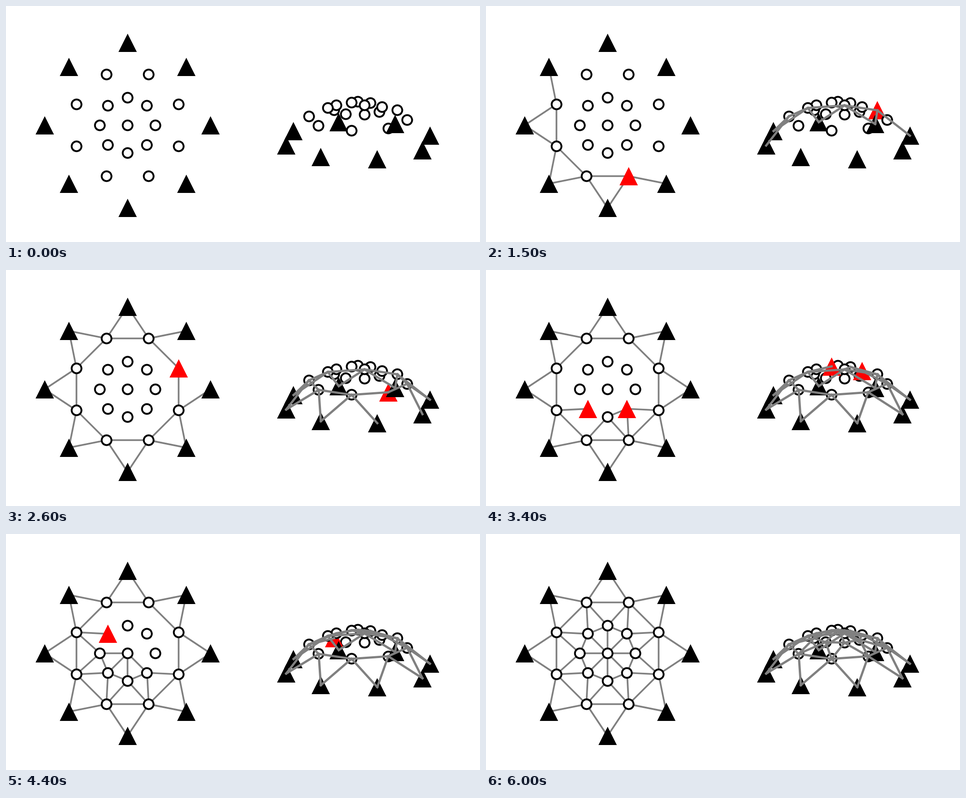
Animation, 1058 px wide and 529 px high, one loop 6.5 s. Source, as an HTML page with a canvas:

```html
<!DOCTYPE html>
<html lang="en">
<head>
<meta charset="utf-8">
<title>Dome assembly</title>
<style>
  html, body { margin: 0; width: 100%; height: 100%; overflow: hidden; background: #fff; }
  canvas { display: block; }
</style>
</head>
<body>
<canvas id="stage" width="1058" height="529"></canvas>
<script>
const ctx = document.getElementById('stage').getContext('2d');
const LOOP = 6500, HOLD = 500, STEP = 100;
const RADIUS = 185.1, RAD = Math.PI / 180;
const TURN = 30 * RAD, TILT = 15 * RAD, VIEW_SCALE = 0.897;

// Rings from the apex down: keys, radius and height as parts of RADIUS, first angle
const rings = [
  { keys: '0', r: 0, z: 0.543, start: 0 },
  { keys: '12345678', r: 1 / 3, z: 0.448, start: 0 },
  { keys: 'abcdefgh', r: 2 / 3, z: 0.314, start: 202.5 },
  { keys: 'ABCDEFGH', r: 1, z: 0, start: 225 }
];

// Assembly order: the first joint of each word is tied to the others in turn
const bars = ('aBb bBCc cCD aA dcDE edFfE haA hg gHG hH fgGF ' +
  '7cd8 8d 6b 8e 67c 5ba6 07865 4ah5 1e8f 04 2gf1 3hg24 0321')
  .split(' ').flatMap(([from, ...ends]) => ends.map(end => from + end));

const names = [], plan = {}, view = {};
for (const { keys, r, z, start } of rings) {
  [...keys].forEach((key, i) => {
    const a = (start - 45 * i) * RAD, dist = r * RADIUS;
    const side = VIEW_SCALE * dist;
    const lift = VIEW_SCALE * z * RADIUS * Math.cos(TILT);
    names.push(key);
    plan[key] = [271.3 + dist * Math.cos(a), 267.4 + dist * Math.sin(a)];
    view[key] = [
      785.75 + side * Math.cos(TURN - a),
      301.7 + side * Math.sin(TURN - a) * Math.sin(TILT) - lift
    ];
  });
}

// Markers sit on pixel centres
const snap = p => p.map(v => Math.floor(v) + 0.5);

function triangle(p, color) {
  const [x, y] = snap(p), h = 20.5;
  ctx.fillStyle = color;
  ctx.beginPath();
  ctx.moveTo(x, y - h);
  ctx.lineTo(x + h, y + h);
  ctx.lineTo(x - h, y + h);
  ctx.fill();
}

function joint(p) {
  const [x, y] = snap(p);
  ctx.beginPath();
  ctx.arc(x, y, 11, 0, 2 * Math.PI);
  ctx.fillStyle = '#fff';
  ctx.fill();
  ctx.lineWidth = 4;
  ctx.strokeStyle = '#000';
  ctx.stroke();
}

function drawBars(pos, count, width) {
  ctx.lineWidth = width;
  ctx.lineCap = 'square';
  ctx.strokeStyle = '#808080';
  for (const [a, b] of bars.slice(0, count)) {
    ctx.beginPath();
    ctx.moveTo(...pos[a]);
    ctx.lineTo(...pos[b]);
    ctx.stroke();
  }
}

const degree = (key, count) =>
  bars.slice(0, count).filter(bar => bar.includes(key)).length;

// A joint is propped until the step after its third bar
const propped = (key, count) =>
  degree(key, count) > 0 && degree(key, count - 1) < 3;

function drawNodes(pos, count) {
  for (const key of names) {
    if (key >= 'A' && key <= 'H') triangle(pos[key], '#000');
    else if (count && propped(key, count)) triangle(pos[key], '#f00');
    else joint(pos[key]);
  }
}

function draw(count) {
  ctx.fillStyle = '#fff';
  ctx.fillRect(0, 0, 1058, 529);
  drawBars(plan, count, 3.8);
  drawNodes(plan, count);
  drawNodes(view, count);
  drawBars(view, count, 5);
}

let shown = -1;
function tick() {
  const t = performance.now() % LOOP;
  const count = t < HOLD ? 0 : Math.min(bars.length, Math.floor((t - HOLD) / STEP) + 1);
  if (count !== shown) draw(shown = count);
  requestAnimationFrame(tick);
}
tick();
</script>
</body>
</html>
```
